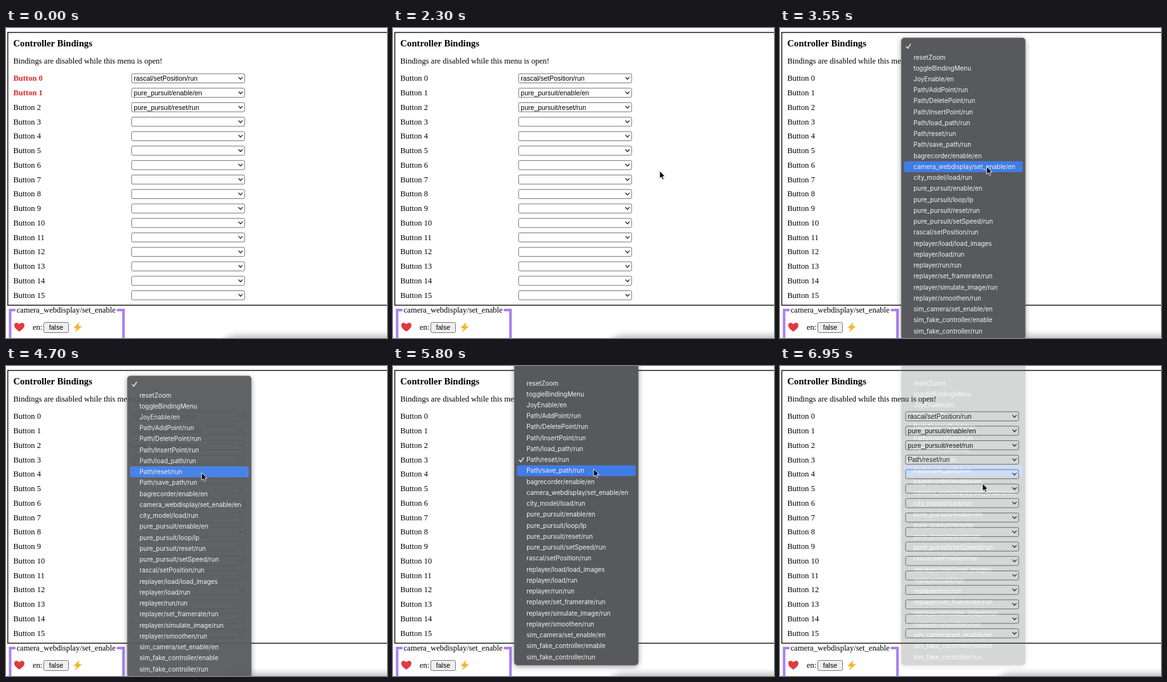
Write an HTML page that moves like this. It is 600 px wide and 488 px high and loops after 7000 ms.

```html
<!DOCTYPE html>
<html lang="en">
<head>
<meta charset="utf-8">
<title>Controller Bindings</title>
<style>
  html, body { margin: 0; width: 100%; height: 100%; overflow: hidden; background: #fff; }
  svg { display: block; }
  text { font: 12.53px "Liberation Serif", Times, serif; white-space: pre; }
  .title { font-size: 14.65px; font-weight: bold; }
  .on { font-weight: bold; fill: #e0292d; }
  .ui { font: 10.5px "Liberation Sans", Arial, sans-serif; }
  .box { fill: #fff; stroke: #767676; }
  .tick { fill: none; stroke-width: 1.3; stroke-linecap: round; stroke-linejoin: round; }
  #menu text { font: 9.9px Inter, sans-serif; fill: #f4f4f4; }
  #panel { fill: #58595c; stroke: #77787a; stroke-width: .6; filter: drop-shadow(0 2px 4px rgba(0,0,0,.38)); }
  #dock { filter: blur(5px); }
</style>
</head>
<body>
<svg width="600" height="488" viewBox="0 0 600 488">
  <rect width="600" height="488" fill="#fff"/>
  <path id="dock" d="M640 483H370Q342 483 338 500H640Z" fill="#000" opacity=".24"/>
  <rect x="2.8" y="7" width="640" height="429.4" fill="#fff" stroke="#111" stroke-width="1.4"/>
  <text class="title" x="11.5" y="28.6">Controller Bindings</text>
  <text x="11.5" y="56.3">Bindings are disabled while this menu is open!</text>
  <g id="rows"></g>

  <path d="M15 444H6.5V500M174.5 444H185V500" fill="none" stroke="#ab80f0" stroke-width="4"/>
  <text x="16.8" y="448.3">camera_webdisplay/set_enable</text>
  <path d="M21 478C17 475 13 472 13 468C13 463.3 18.8 462.8 21 466.6C23.2 462.8 29 463.3 29 468C29 472 25 475 21 478Z" fill="#df3a40"/>
  <text x="42" y="475.3">en:</text>
  <rect x="59.5" y="463.5" width="39" height="16" rx="2.2" fill="#efefef" stroke="#767676"/>
  <text class="ui" x="67.8" y="475">false</text>
  <path d="M115.5 463L106.5 472.2L111.5 473L108 479.5L119.5 469.8L114.2 469Z" fill="#fcb127"/>

  <g id="menu">
    <rect id="panel" x="191" width="195.3" rx="5"/>
    <rect id="hover" x="195" width="187.3" height="17.2" rx="3" fill="#407ce6"/>
    <g id="items"></g>
    <path id="check" class="tick" d="M199 .5L201.3 3.2L205.6 -3.4" stroke="#fff"/>
    <path id="more" class="tick" d="M284.6 479.3L288 482.6L291.4 479.3" stroke="#fff"/>
  </g>
  <path id="cursor" d="M0 0V12L2.7 9.6L4.6 13.8L6.6 12.9L4.8 8.8H8.5Z" fill="#000" stroke="#fff" stroke-width=".9"/>
</svg>
<script>
const $ = id => document.getElementById(id);
const LOOP = 7000, ROW = 22.77, ITEM = 17.24, FADE = 200;

const bound = ['rascal/setPosition/run', 'pure_pursuit/enable/en', 'pure_pursuit/reset/run'];
const options = ['', 'resetZoom', 'toggleBindingMenu', 'JoyEnable/en',
  ...['AddPoint', 'DeletePoint', 'InsertPoint', 'load_path', 'reset', 'save_path'].map(n => `Path/${n}/run`),
  'bagrecorder/enable/en', 'camera_webdisplay/set_enable/en', 'city_model/load/run',
  'pure_pursuit/enable/en', 'pure_pursuit/loop/lp', 'pure_pursuit/reset/run', 'pure_pursuit/setSpeed/run',
  'rascal/setPosition/run', 'replayer/load/load_images', 'replayer/load/run', 'replayer/run/run',
  'replayer/set_framerate/run', 'replayer/simulate_image/run', 'replayer/smoothen/run',
  'sim_camera/set_enable/en', 'sim_fake_controller/enable', 'sim_fake_controller/run'];

// Press and release time of each controller button
const presses = [[0, 350], [0, 450], [150, 550], [300, 700], [850, 1450], [950, 1500],
  [1050, 1650], [1200, 1750], [1700, 1900], [1800, 2050]];
// Cursor stops: time, x, y
const path = [[1950, 600, 486], [2300, 420, 225], [2500, 331, 152.5], [3120, 330.5, 152.5],
  [3500, 325.5, 218], [3900, 324, 220], [4500, 308, 168], [4900, 308, 168], [5300, 389, 165],
  [5400, 424, 155], [5620, 330, 150], [5800, 316, 162], [6800, 316, 162], [6950, 319, 185]];
// Menu openings: y of the first option before and after scrolling, and the checked option
const menus = [
  { open: 2600, close: 4690, from: 150.3, to: 28.8, checked: 0 },
  { open: 5650, close: 6800, from: 9.8, to: 9.8, checked: 8 }];

$('rows').innerHTML = Array.from({ length: 16 }, (_, i) => {
  const y = 79.2 + i * ROW;
  return `<text class="label" x="11.5" y="${y + 4}">Button ${i}</text>
    <rect class="box" x="197.8" y="${y - 7.2}" width="178" height="14.4" rx="2"/>
    <text class="ui value" x="201.3" y="${y + 3.8}">${bound[i] || ''}</text>
    <path class="tick" d="M366.4 ${y - 1.6}l2.9 3.1l2.9 -3.1" stroke="#222"/>`;
}).join('');
$('items').innerHTML = options.map((name, i) =>
  `<text x="210.3" y="${i * ITEM + 3.5}">${name}</text>`).join('');

const labels = [...document.querySelectorAll('.label')];
const newValue = document.querySelectorAll('.value')[3];
const items = [...$('items').children];
const smooth = u => { u = Math.min(1, Math.max(0, u)); return u * u * (3 - 2 * u); };
const move = (id, x, y) => $(id).setAttribute('transform', `translate(${x} ${y})`);
const show = (el, on) => el.setAttribute('visibility', on ? 'inherit' : 'hidden');

function cursorAt(t) {
  const n = path.findIndex(p => p[0] > t);
  if (n < 1) return path[n < 0 ? path.length - 1 : 0].slice(1);
  const [a, b] = [path[n - 1], path[n]], u = smooth((t - a[0]) / (b[0] - a[0]));
  return [a[1] + (b[1] - a[1]) * u, a[2] + (b[2] - a[2]) * u];
}

function drawMenu(t) {
  const m = menus.find(m => t >= m.open && t < m.close + FADE);
  $('menu').setAttribute('visibility', m ? 'visible' : 'hidden');
  if (!m) return;
  $('menu').setAttribute('opacity', Math.min(1, 1 - (t - m.close) / FADE));
  const base = m.from + (m.to - m.from) * smooth((t - 2900) / 220);
  const cut = base > 35;
  const y = cursorAt(Math.min(t, m.close))[1];
  $('panel').setAttribute('y', base - 13.4);
  $('panel').setAttribute('height', (options.length - 1) * ITEM + 26.4);
  move('hover', 0, base + Math.round((y - base) / ITEM) * ITEM - 8.6);
  move('items', 0, base);
  move('check', 0, base + m.checked * ITEM);
  items.forEach((el, i) => show(el, !cut || base + i * ITEM < 470));
  show($('more'), cut);
}

function frame(now) {
  const t = now % LOOP;
  labels.forEach((el, i) => {
    const [down, up] = presses[i] || [0, 0];
    el.classList.toggle('on', t >= down && t < up);
  });
  newValue.textContent = t >= menus[0].close ? options[8] : '';
  drawMenu(t);
  show($('cursor'), t >= path[0][0]);
  move('cursor', ...cursorAt(t));
}

const start = performance.now();
(function tick() {
  frame(performance.now() - start);
  requestAnimationFrame(tick);
})();
</script>
</body>
</html>
```
